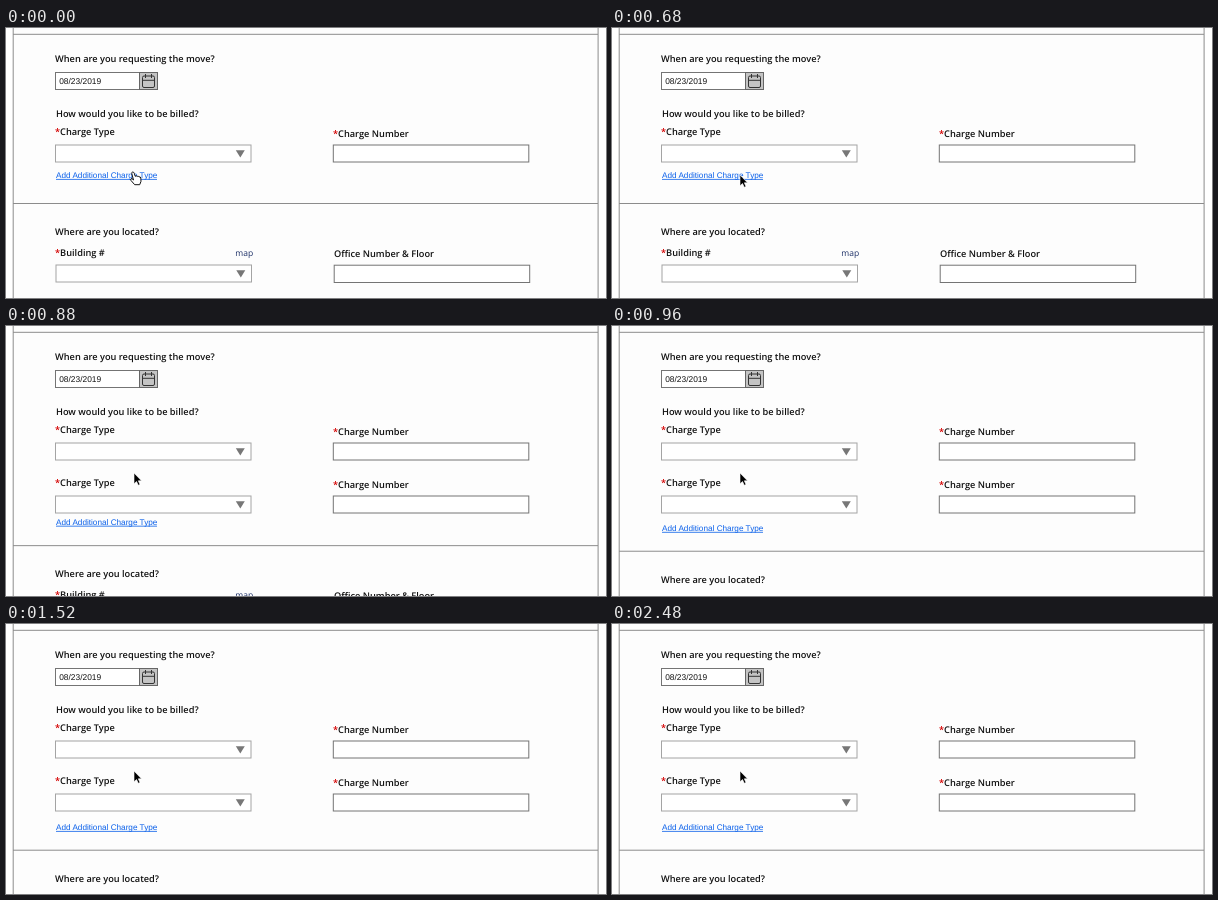
Animation, 600 px wide and 270 px high, one loop 2520 ms. Source, as an HTML page:

```html
<!DOCTYPE html>
<html lang="en">
<head>
<meta charset="utf-8">
<title>Move request form</title>
<style>
  html, body { margin: 0; width: 100%; height: 100%; overflow: hidden; background: #fff; }
  svg { display: block; width: 600px; height: 270px; }
  text { font: 600 9.22px "Open Sans", sans-serif; fill: #111; text-rendering: geometricPrecision; }
  .sans { font: 8.4px "Liberation Sans", Arial, sans-serif; }
  .link { font-size: 8.2px; fill: #0a60ea; }
  .map { font-weight: 400; font-size: 8.5px; fill: #1c2f66; }
  .req { fill: #d40000; }
  .line { stroke: #8c8c8c; fill: none; }
  .select { fill: #fff; stroke: #a4a4a4; }
  .input { fill: #fff; stroke: #747474; }
  .arrow { fill: #777; }
</style>
</head>
<body>
<svg viewBox="0 0 600 270">
  <defs>
    <g id="select">
      <rect class="select" x="49.5" y="117" width="195.5" height="17"/>
      <path class="arrow" d="M229.8 122.2h9l-4.5 7.2z"/>
    </g>
    <g id="charge">
      <text x="49" y="107"><tspan class="req">*</tspan>Charge Type</text>
      <text x="327" y="108.8"><tspan class="req">*</tspan>Charge Number</text>
      <use href="#select"/>
      <rect class="input" x="327.3" y="117" width="195.5" height="17"/>
    </g>
  </defs>

  <rect x="7" width="585" height="270" fill="#fdfdfd"/>
  <path class="line" d="M7.2 0V270M592.1 0V270M7 6.3H592"/>

  <text x="49" y="34">When are you requesting the move?</text>
  <rect class="input" x="49.5" y="44.5" width="84" height="17"/>
  <text class="sans" x="53.2" y="56.3">08/23/2019</text>
  <rect x="133.5" y="44.5" width="18" height="17" fill="#c4c4c4" stroke="#666"/>
  <g fill="none" stroke="#333">
    <rect x="136.5" y="48" width="12" height="11.5" rx="1.5"/>
    <path d="M136.5 52.3h12M139.5 46v4M145.5 46v4"/>
  </g>

  <text x="50" y="89.3">How would you like to be billed?</text>
  <use href="#charge"/>

  <g id="lower">
    <path class="line" d="M7 175.5H592"/>
    <text x="49" y="207">Where are you located?</text>
    <text x="49" y="228"><tspan class="req">*</tspan>Building #</text>
    <text class="map" x="229.3" y="228">map</text>
    <text x="328" y="229.2">Office Number &amp; Floor</text>
    <use href="#select" x=".5" y="120"/>
    <rect class="input" x="328.2" y="237.2" width="195.5" height="17.3"/>
  </g>

  <g id="added" transform="translate(0 53)"><use href="#charge"/></g>
  <g id="link">
    <text class="sans link" x="50" y="150.3">Add Additional Charge Type</text>
    <path d="M50 151.4H151" stroke="#0a60ea" stroke-width=".8"/>
  </g>

  <circle id="ripple" cx="127" cy="147.5" fill="#777"/>
  <path id="hand" fill="#fff" stroke="#111" stroke-linejoin="round"
    d="M127.5 152L125.8 145.700Q125.400 144.200 126.700 144Q127.900 144 128.300 145.300L129.200 148.300Q130.200 147.300 131.200 148.400Q132.300 147.500 133 148.900Q134.400 148.400 134.800 150L135 153.300L133.700 156.700H128.700L125 152.500Q124.200 150.500 125.800 150.400Z"/>
  <path id="pointer" fill="#000" stroke="#fff" stroke-width=".6"
    d="M128 147V157.800L130.500 155.500L132.300 159.300L134 158.500L132.300 154.800H135.500Z"/>
</svg>
<script>
const LOOP = 2520;
const el = id => document.getElementById(id);
const clamp = v => Math.min(1, Math.max(0, v));
const shift = (id, y) => el(id).setAttribute("transform", `translate(0 ${y})`);
const show = (id, opacity) => el(id).setAttribute("opacity", opacity);

function draw(now) {
  const t = now % LOOP;
  const open = 1 - (1 - clamp((t - 740) / 352)) ** 4;
  shift("lower", 50.7 * open);
  shift("link", 56 * open);
  show("added", clamp((t - 725) / 145));

  const click = clamp((t - 20) / 420);
  el("ripple").setAttribute("r", 24 * click);
  show("ripple", 0.4 * (1 - click));

  show("hand", t < 640 ? 1 : 0);
  show("pointer", t < 640 ? 0 : 1);
  requestAnimationFrame(draw);
}
draw(performance.now());
</script>
</body>
</html>
```
